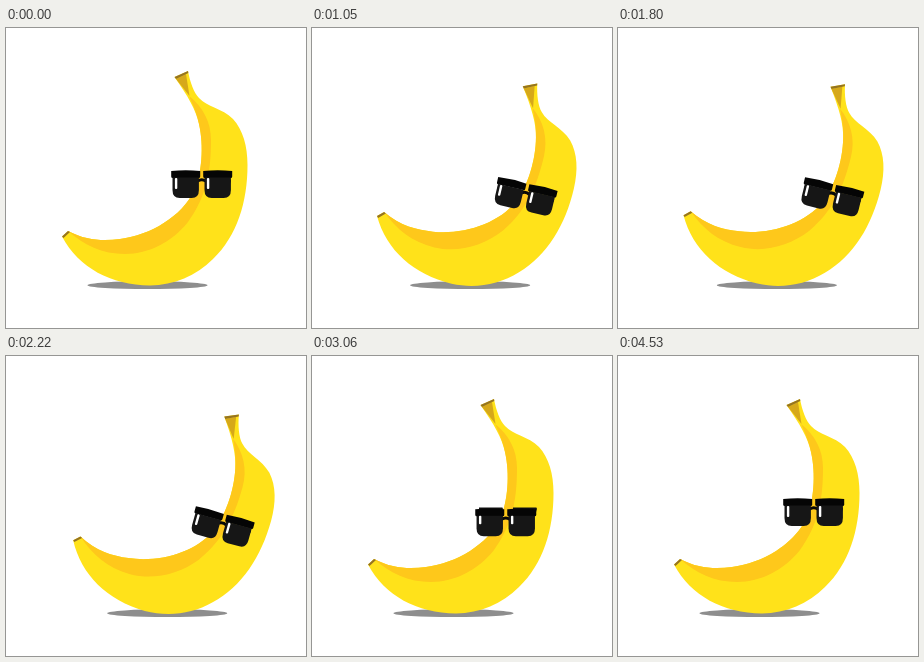
These frames come from a looping animation (300x300 px, 4560 ms). An HTML page:

```html
<!DOCTYPE html>
<html lang="en">
<head>
<meta charset="utf-8">
<title>Cool banana</title>
<style>
  html, body { margin: 0; height: 100%; overflow: hidden; background: #fff; }
  svg { display: block; width: 100%; height: 100%; }
</style>
</head>
<body>
<svg viewBox="0 0 300 300">
  <defs>
    <g id="eye">
      <path d="M1 0.5Q2 10 12 10Q22 10 23 0.5Z" fill="#fff" stroke="#111" stroke-width="1.6"/>
      <path d="M9 0.5Q9 7 14 7Q19 7 19 0.5Z" fill="#111"/>
      <circle cx="12.5" cy="3" r="1.1" fill="#fff"/>
      <path d="M0 0H23.5" stroke="#111" stroke-width="2"/>
    </g>
    <g id="lens">
      <path d="M-14.5 1Q0 -0.500 14.500 1V6.500Q14.500 8 13 8H-13Q-14.500 8 -14.500 6.500Z" fill="#050505"/>
      <path d="M-13.200 7.500H13.200V20Q13.200 28 6 28H-6Q-13.200 28 -13.200 20Z" fill="#161616"/>
      <rect class="shine" x="-10.800" width="2.400" rx="1" fill="#fff"/>
    </g>
  </defs>
  <ellipse id="shadow" cx="141.5" cy="257.2" rx="60" ry="3.9" fill="#8e8e8e"/>
  <g id="banana">
    <path fill="#ffe21a" d="M168.500 49L182 43C184 54 188 65 193 70C201 79 216 80 227 91C237 102 241.500 118 241.500 137C241.500 174 231 208 207 231C190 248 168 257 144 257.500C105 257 73 240 56 208.500L62 203C81 213 98 213 114 211C145 207 176 188 188 163C196 146 198 118 193 96C190 82 182 68 168.500 49Z"/>
    <path fill="#fec81b" d="M183 68C197 79 205 94 205 112C205 145 200 169 182 194C166 214 143 226 119 226C96 226 78 217 62 203C81 213 98 213 114 211C145 207 176 188 188 163C196 146 198 118 193 96C191 86 188 79 183 68Z"/>
    <path fill="#d6a81a" d="M170 51L180 46L183.500 68Z"/>
    <path fill="#967421" d="M168.500 49L182 43L182.300 45L170 51ZM56 208.500L62 203L64 204L57.500 210Z"/>
    <use href="#eye" x="167" y="152.5"/>
    <use href="#eye" x="201" y="152.5"/>
    <g id="glasses">
      <path d="M-4 11Q0 8.500 4 11" fill="none" stroke="#080808" stroke-width="3"/>
      <use href="#lens" x="-16"/>
      <use href="#lens" x="16"/>
    </g>
  </g>
</svg>
<script>
  const LOOP = 4560;
  const tilt = [[0, 0], [720, 17], [780, 17], [1500, 4.5], [1960, 17], [2090, 17], [2780, 0]];
  const slide = [[2830, 0], [3300, 1], [4160, 1], [4530, 0]];
  const [banana, shadow, glasses] = ["banana", "shadow", "glasses"].map(id => document.getElementById(id));
  const shine = document.querySelector(".shine");

  const ease = u => (1 - Math.cos(Math.PI * u)) / 2;

  function valueAt(keys, t) {
    if (t <= keys[0][0]) return keys[0][1];
    const i = keys.findIndex(key => key[0] > t);
    if (i < 0) return keys[keys.length - 1][1];
    const [t0, a] = keys[i - 1], [t1, b] = keys[i];
    return a + (b - a) * ease((t - t0) / (t1 - t0));
  }

  function draw(now) {
    const t = now % LOOP;
    const angle = valueAt(tilt, t), down = valueAt(slide, t);
    const roll = angle * 1.27;
    shadow.setAttribute("transform", `translate(${roll} 0)`);
    banana.setAttribute("transform", `translate(${roll} 0) rotate(${angle} 141 165)`);
    glasses.setAttribute("transform", `translate(${195.7 - 4 * down} ${142 + 21 * down})`);
    shine.setAttribute("y", 8 - down);
    shine.setAttribute("height", 11 - 5 * down);
    requestAnimationFrame(draw);
  }
  requestAnimationFrame(draw);
</script>
</body>
</html>
```
